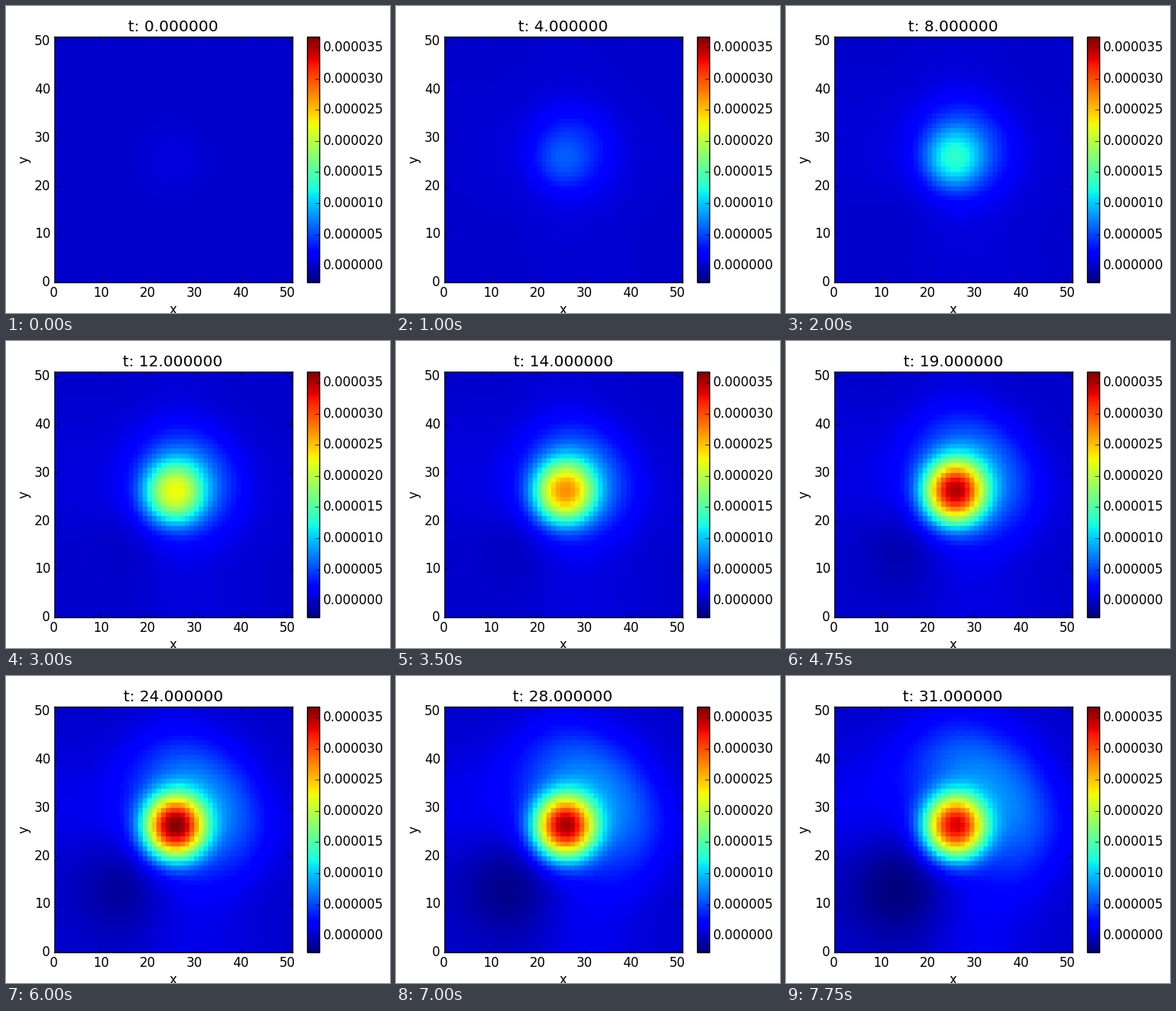
These frames come from a looping animation (500 px wide and 400 px high, 8000 ms). A matplotlib script:

```python
import numpy as np
import matplotlib.pyplot as plt
from matplotlib.animation import FuncAnimation

STEPS = 32
CELLS = 51
MICRO = 1e-6

plt.style.use("classic")
plt.rcParams.update({
    "font.family": "DejaVu Sans",
    "figure.facecolor": "white",
    "xtick.major.pad": 3.4,
    "ytick.major.pad": 3.4,
    "axes.labelpad": 3,
})

# Peak height over time, in millionths
KEY_T = np.array([0, 4, 8, 12, 16, 20, 24, 28, 31], float)
KEY_V = np.array([0.6, 5.8, 13.2, 22.5, 31.2, 35.8, 36.6, 35.2, 33.5])
KEY_D = np.gradient(KEY_V, KEY_T)

mid = np.arange(CELLS) + 0.5
X, Y = np.meshgrid(mid, mid)


def peak(t):
    """Cubic Hermite curve through the keyed peak heights."""
    i = min(np.searchsorted(KEY_T, t, side="right") - 1, len(KEY_T) - 2)
    h = KEY_T[i + 1] - KEY_T[i]
    s = (t - KEY_T[i]) / h
    return ((1 + 2 * s) * (1 - s) ** 2 * KEY_V[i]
            + s * (1 - s) ** 2 * h * KEY_D[i]
            + s * s * (3 - 2 * s) * KEY_V[i + 1]
            + s * s * (s - 1) * h * KEY_D[i + 1])


def bell(x, y, cx, cy, width, power=1.0):
    r2 = (x - cx) ** 2 + (y - cy) ** 2
    return np.exp(-(r2 / (2 * width ** 2)) ** power)


def plume(x, y, u):
    """Widening arc around the core, strongest towards the upper right."""
    dx, dy = x - 26, y - 26
    r = np.hypot(dx, dy)
    tilt = (1 + (dx + dy) / np.sqrt(2) / (r + 0.5)) / 2
    radius, width = 6.5 + 6.5 * u, 3 + 3.5 * u
    arc = np.exp(-((r - radius) / width) ** 2 / 2)
    return 7.2 * u ** 0.7 * arc * tilt ** 1.3


def surroundings(x, y, u):
    sink = 2.9 * u ** 1.6 * bell(x, y, 17 - 3 * u, 16 - 2.8 * u, 3.5 + 4.2 * u)
    halo = 8 * u * (1 - u) * bell(x, y, 26, 26, 9)
    cross = 0.6 * u * (np.exp(-(x - 26) ** 2 / 60) + np.exp(-(y - 26) ** 2 / 60))
    rim = 0.9 * u * (bell(x, y, 0, 34, 7) + bell(x, y, 34, 0, 7))
    return plume(x, y, u) - sink + halo + cross + rim


def field(t):
    u = t / (STEPS - 1)
    grow = min(1, 2 * u)
    cx, cy = 25.5 + 0.4 * grow, 25.5 + 0.6 * grow
    height = peak(t) - surroundings(cx, cy, u)
    core = height * bell(X, Y, cx, cy, 4.2 + 0.5 * grow, 1.12)
    return (core + surroundings(X, Y, u)) * MICRO


fig = plt.figure(figsize=(5, 4), dpi=100)
ax = fig.add_axes([0.125, 0.1, 0.62, 0.8])
cax = fig.add_axes([0.78375, 0.1, 0.032, 0.8])

edges = np.arange(CELLS + 1)
mesh = ax.pcolormesh(edges, edges, field(0), cmap="jet",
                     vmin=-2.7 * MICRO, vmax=36.73 * MICRO)
ax.set_xlim(0, CELLS)
ax.set_ylim(0, CELLS)
ax.set_xlabel("x")
ax.set_ylabel("y")
title = ax.set_title("t: 0.000000")
bar = fig.colorbar(mesh, cax=cax, format="%.6f", ticks=np.arange(8) * 5 * MICRO)
bar.minorticks_off()


def update(t):
    mesh.set_array(field(t))
    title.set_text(f"t: {t:.6f}")
    return mesh, title


anim = FuncAnimation(fig, update, frames=STEPS, interval=250,
                     repeat=True, repeat_delay=0, blit=False)
plt.show()
```
